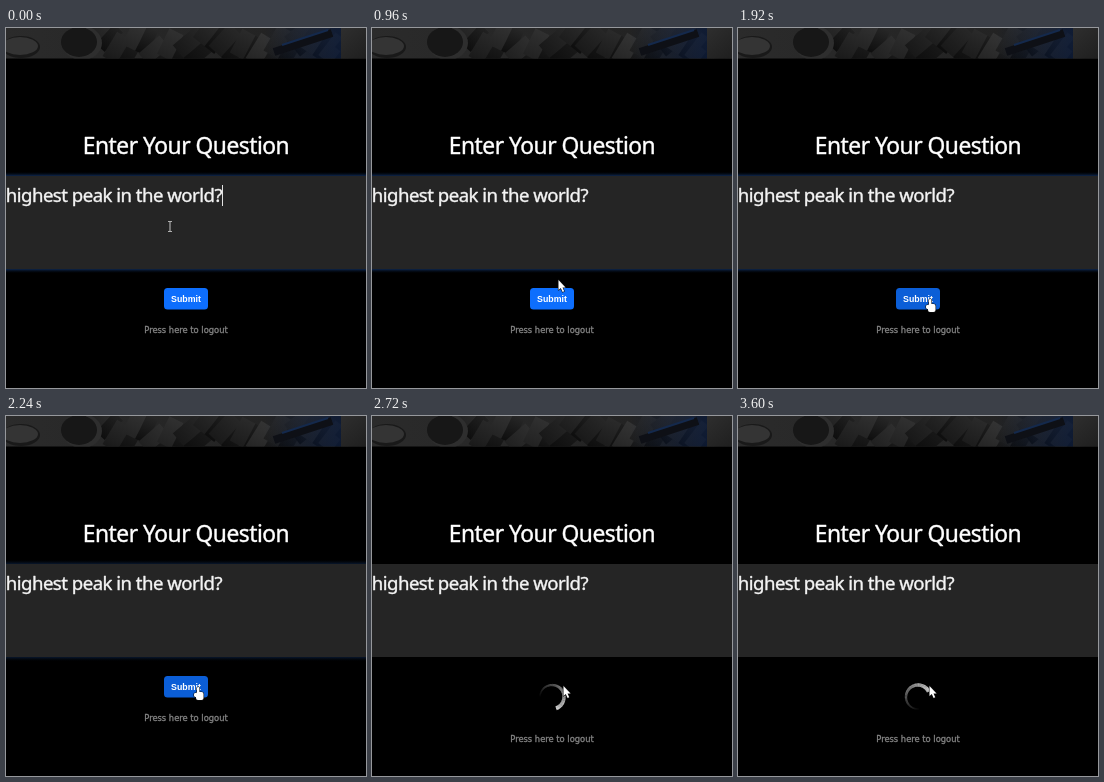
These frames come from a looping animation (360 px wide and 360 px high, 3.76 s). An HTML page with a canvas:

```html
<!DOCTYPE html>
<html lang="en">
<head>
<meta charset="utf-8">
<title>Enter Your Question</title>
<style>
html, body { margin: 0; width: 100%; height: 100%; overflow: hidden; background: #000; }
canvas { display: block; width: 360px; height: 360px; }
</style>
</head>
<body>
<canvas id="stage" width="360" height="360"></canvas>
<script>
const ctx = document.getElementById('stage').getContext('2d');
const LOOP = 3760, STEP = 80, BLURRED = 2160, SUBMITTED = 2320;

// Where the pointer rests along its way
const STOPS = [
  { t: 160, x: 164, y: 198 },
  { t: 960, x: 187, y: 252 },
  { t: 1280, x: 185, y: 261 },
  { t: 2000, x: 192, y: 270 }
];

const ease = k => k * k * (3 - 2 * k);
const clamp = k => Math.min(1, Math.max(0, k));
const gray = v => `rgb(${v}, ${v}, ${v})`;

function pointerAt(t) {
  let { x, y } = STOPS[0];
  for (let i = 1; i < STOPS.length; i++) {
    const from = STOPS[i - 1], to = STOPS[i];
    const k = ease(clamp((t - from.t) / (to.t - from.t)));
    x += (to.x - from.x) * k;
    y += (to.y - from.y) * k;
  }
  return [x, y];
}

function seeded(seed) {
  return () => (seed = (seed * 16807) % 2147483647) / 2147483647;
}

function rect(color, x, y, w, h) {
  ctx.fillStyle = color;
  ctx.fillRect(x, y, w, h);
}

function fade(from, to, x0, y0, x1, y1) {
  const g = ctx.createLinearGradient(x0, y0, x1, y1);
  g.addColorStop(0, from);
  g.addColorStop(1, to);
  return g;
}

function oval(color, x, y, rx, ry) {
  ctx.beginPath();
  ctx.ellipse(x, y, rx, ry, 0, 0, Math.PI * 2);
  ctx.fillStyle = color;
  ctx.fill();
}

function line(color, width, x0, y0, x1, y1) {
  ctx.beginPath();
  ctx.moveTo(x0, y0);
  ctx.lineTo(x1, y1);
  ctx.lineWidth = width;
  ctx.strokeStyle = color;
  ctx.stroke();
}

// A little stroke gives the letters a firmer weight
function text(str, x, y, { font, color, align = 'center', spacing = 0, weight = 0 }) {
  ctx.font = font;
  ctx.textAlign = align;
  ctx.letterSpacing = spacing + 'px';
  ctx.fillStyle = ctx.strokeStyle = color;
  ctx.fillText(str, x, y);
  if (weight) {
    ctx.lineWidth = weight;
    ctx.lineJoin = 'round';
    ctx.strokeText(str, x, y);
  }
}

// A tilted cube with a lit and a shaded face
function cube(x, y, size, turn, shade) {
  ctx.save();
  ctx.translate(x, y);
  ctx.rotate(turn);
  rect(fade(gray(shade), gray(shade - 14), 0, -size, 0, size), -size, -size, size * 1.1, size * 2);
  rect(fade(gray(shade - 12), gray(14), 0, -size, 0, size), size * 0.1, -size, size * 0.9, size * 2);
  ctx.restore();
}

function banner() {
  const rnd = seeded(71);
  ctx.save();
  ctx.beginPath();
  ctx.rect(0, 0, 360, 30.5);
  ctx.clip();
  rect(fade('#2b2b2b', '#202020', 0, 0, 360, 0), 0, 0, 360, 31);
  for (let i = 0; i < 15; i++) {
    cube(98 + i * 18, 5 + rnd() * 22, 12 + rnd() * 4, 0.3 + rnd() * 0.7, 38 + Math.floor(rnd() * 14));
  }
  oval('#191919', 15, 19, 19, 11);
  oval('#343434', 14, 18, 18, 9);
  oval('#2e2e2e', 76, 15, 20, 17);
  oval('#171717', 73, 14, 18, 15);
  rect(fade('rgba(10, 26, 58, 0)', 'rgba(10, 26, 58, 0.75)', 258, 0, 335, 0), 258, 0, 77, 31);
  line('#0e1016', 8, 268, 24, 326, 5);
  line('#14294c', 2, 276, 17, 322, 2);
  rect(fade('#2e2e2e', '#1f1f1f', 335, 0, 360, 31), 335, 0, 25, 31);
  ctx.restore();
}

function edge(y, dir, focus) {
  const far = y + dir * 4;
  const glow = fade(`rgba(14, 38, 76, ${focus})`, 'rgba(6, 18, 36, 0)', 0, y, 0, far);
  rect(glow, 0, Math.min(y, far), 360, 4);
}

function field(t) {
  rect('#252525', 0, 148, 360, 93);
  if (t < SUBMITTED) {
    const focus = t < BLURRED ? 1 : 0.6;
    edge(148, -1, focus);
    edge(241, 1, focus);
  }
  text('highest peak in the world?', 216, 174, {
    font: '18.6px "Noto Sans", sans-serif', color: '#f4f4f4', align: 'right', spacing: -0.52, weight: 0.4
  });
  const caretOn = (t + 50) % 1060 < 530;
  if (caretOn && t < BLURRED) rect('#e2e2e2', 216, 157, 1, 21);
}

function button(hover) {
  ctx.beginPath();
  ctx.roundRect(158, 260, 44, 21.5, 3.5);
  ctx.fillStyle = hover ? '#0b5ed7' : '#0d6efd';
  ctx.fill();
  text('Submit', 180, 274, { font: 'bold 8.8px "Liberation Sans", Arial, sans-serif', color: '#fff' });
}

function spinner(t) {
  const head = (70 + (t - 2720) * 0.3) * Math.PI / 180;
  const n = 72, d = Math.PI * 1.4 / n;
  for (let i = n; i >= 0; i--) {
    const k = 1 - i / n, a = head - i * d;
    ctx.beginPath();
    ctx.arc(180, 281, 12, a - d * 1.2, a);
    ctx.lineWidth = 1.2 + 2.8 * k;
    ctx.strokeStyle = gray(Math.round(225 * k));
    ctx.stroke();
  }
}

function beam() {
  rect('#c4c4c4', -0.5, -4, 1, 9);
  rect('#b0b0b0', -2, -5, 4, 1);
  rect('#b0b0b0', -2, 5, 4, 1);
}

function outlined(shape) {
  ctx.lineJoin = 'round';
  ctx.lineWidth = 1.2;
  ctx.strokeStyle = '#111';
  ctx.stroke(shape);
  ctx.fillStyle = '#fff';
  ctx.fill(shape);
}

function hand() {
  const shape = new Path2D();
  shape.roundRect(-1, 1, 2.4, 9, 1.2);
  shape.roundRect(-2, 6, 7.5, 8, 2);
  shape.roundRect(-4, 7, 3, 4, 1.4);
  outlined(shape);
}

function arrow() {
  outlined(new Path2D('M-.5 0V10L1.8 8L3.6 12L5.2 11.3L3.5 7.5H6.5Z'));
}

function draw(t) {
  const done = t >= SUBMITTED;
  const [x, y] = pointerAt(t);
  const hover = !done && y >= 260;
  rect('#000', 0, 0, 360, 360);
  banner();
  text('Enter Your Question', 180, 125.5, {
    font: '22.8px "Noto Sans", sans-serif', color: '#fff', spacing: -0.5, weight: 0.4
  });
  field(t);
  if (done) spinner(t);
  else button(hover);
  text('Press here to logout', 180, done ? 326 : 305, {
    font: '8.35px "DejaVu Sans", sans-serif', color: '#858585', weight: 0.3
  });
  ctx.save();
  ctx.translate(Math.round(x), Math.round(y));
  if (hover) hand();
  else if (y < 241) beam();
  else arrow();
  ctx.restore();
}

// The picture holds for one extra step out of every five
function hold(t) {
  const n = Math.floor(t / STEP);
  return (n % 5 === 1 ? n - 1 : n) * STEP;
}

const start = performance.now();
function tick() {
  draw(hold((performance.now() - start) % LOOP));
  requestAnimationFrame(tick);
}
tick();
</script>
</body>
</html>
```
